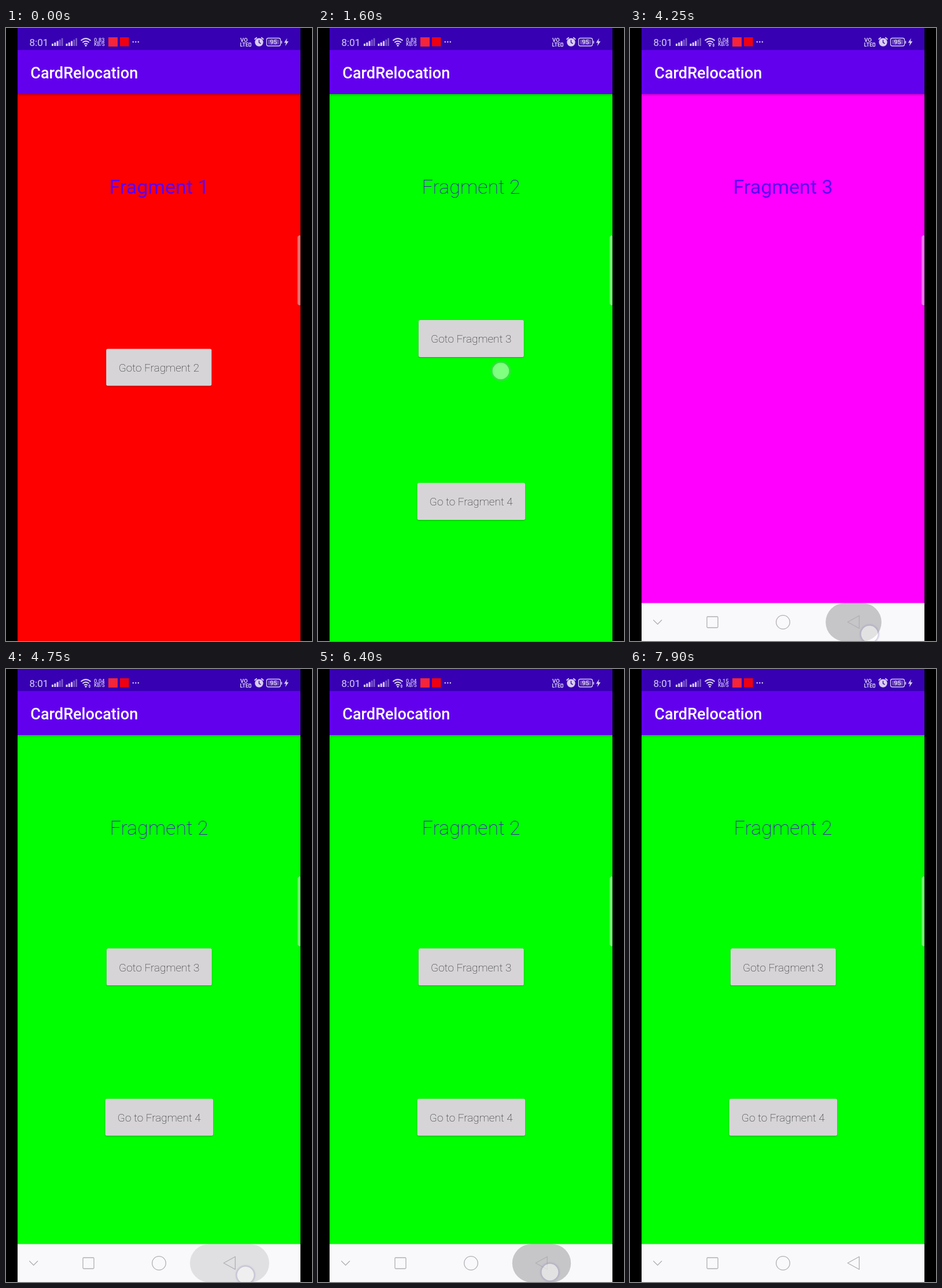
Animation of 529 by 1058 pixels, one loop 8000 ms. Source, as an HTML page:

```html
<!DOCTYPE html>
<html lang="en">
<head>
<meta charset="utf-8">
<title>Fragment screens</title>
<style>
html, body { margin: 0; width: 100%; height: 100%; overflow: hidden; background: #000; }
svg { display: block; width: 100%; height: 100%; font-family: Roboto, sans-serif; }

/* every track shares the 8 s loop; 1% = 80 ms */
.track { animation: 8s step-end infinite; }
.red { animation-name: red; }
.green { animation-name: green; }
.magenta { animation-name: magenta; }
.white { animation-name: white; }
.shift { animation-name: shift; }
.dot { animation-name: dot; }
.rate1 { animation-name: rate1; }
.rate2 { animation-name: rate2; }
.rate3 { animation-name: rate3; }
.traffic { animation-name: traffic; }
.nav { animation: nav 8s cubic-bezier(.2, .6, .3, 1) infinite; }
.ripple { animation: ripple 8s linear infinite; }

@keyframes red {
  0%, 84.375% { opacity: 1; }
  19.375%, 96.25%, 100% { opacity: 0; }
}
@keyframes green {
  0%, 33.75%, 68.125%, 84.375% { opacity: 0; }
  19.375%, 58.125%, 79.375%, 96.25%, 100% { opacity: 1; }
}
@keyframes magenta {
  0%, 58.125%, 100% { opacity: 0; }
  33.75% { opacity: 1; }
}
@keyframes white {
  0%, 79.375%, 100% { opacity: 0; }
  68.125% { opacity: 1; }
}
/* buttons re-centre once the navigation bar takes its space */
@keyframes shift {
  0% { transform: translateY(0); }
  48.75%, 100% { transform: translateY(var(--d)); }
}
@keyframes nav {
  0%, 46.25% { transform: translateY(66px); }
  49.375%, 100% { transform: translateY(0); }
}
@keyframes dot {
  0% { opacity: 0; transform: translate(316px, 592px); }
  18.125% { opacity: 1; transform: translate(316px, 592px); }
  21.875% { opacity: 0; transform: translate(299px, 528px); }
  32.5% { opacity: 1; transform: translate(299px, 528px); }
  36.25% { opacity: 0; transform: translate(414px, 1046px); }
  52.5% { opacity: 1; transform: translate(414px, 1046px); }
  60.625% { opacity: 0; transform: translate(311.5px, 769.5px); }
  66.875% { opacity: 1; transform: translate(311.5px, 769.5px); }
  69.375% { opacity: 0; transform: translate(401px, 1041px); }
  76.875% { opacity: 1; transform: translate(401px, 1041px); }
  79.375% { opacity: 0; transform: translate(401px, 1041px); }
  80% { opacity: 1; transform: translate(401px, 1041px); }
  86.875% { opacity: 0; transform: translate(312px, 558px); }
  95% { opacity: 1; transform: translate(312px, 558px); }
  98.125%, 100% { opacity: 0; transform: translate(312px, 558px); }
}
@keyframes ripple {
  0%, 52.49% { opacity: 0; x: 386.5px; width: 0; }
  52.5% { opacity: .2; x: 386.5px; width: 0; animation-timing-function: cubic-bezier(.1, .9, .2, 1); }
  56.875% { opacity: .2; x: 318px; width: 137px; animation-timing-function: cubic-bezier(0, 0, .8, 1); }
  62.5% { opacity: 0; x: 318px; width: 137px; }
  76.87% { opacity: 0; x: 386.5px; width: 0; }
  76.875% { opacity: .2; x: 386.5px; width: 0; animation-timing-function: cubic-bezier(.1, .9, .2, 1); }
  79.37% { opacity: .2; x: 318px; width: 137px; }
  79.375% { opacity: .2; x: 386.5px; width: 0; animation-timing-function: cubic-bezier(.1, .9, .2, 1); }
  83.25% { opacity: .2; x: 318px; width: 137px; animation-timing-function: cubic-bezier(0, 0, .8, 1); }
  88.875%, 100% { opacity: 0; x: 318px; width: 137px; }
}
@keyframes rate1 { 0% { opacity: 1; } 48.75%, 100% { opacity: 0; } }
@keyframes rate2 { 0%, 86.25%, 100% { opacity: 0; } 48.75% { opacity: 1; } }
@keyframes rate3 { 0% { opacity: 0; } 86.25%, 100% { opacity: 1; } }
@keyframes traffic { 0%, 86.25%, 100% { opacity: 0; } 40% { opacity: 1; } }

.heading { font-size: 34px; text-anchor: middle; }
.bold { font-weight: 400; fill: #5c00f4; }
.thin { font-weight: 200; fill: #5000d0; }
.label { font-size: 19px; font-weight: 200; text-anchor: middle; fill: #222; }
.button { fill: #d6d4d7; filter: drop-shadow(0 1px 1px rgba(0, 0, 0, .3)); }
.status { fill: #d9cdf2; }
.dim { fill: #7d58cd; }
.tiny { font-size: 9.3px; font-weight: 500; }
.line { fill: none; stroke: #d9cdf2; }
.key { fill: none; stroke: #b1afb5; stroke-width: 1.3; stroke-linejoin: round; stroke-linecap: round; }
</style>
</head>
<body>
<svg viewBox="0 0 529 1058">
  <defs>
    <clipPath id="screen"><rect x="20" width="489" height="1058"/></clipPath>
    <linearGradient id="shade" x2="0" y2="1">
      <stop stop-opacity=".2"/><stop offset="1" stop-opacity="0"/>
    </linearGradient>
    <radialGradient id="halo">
      <stop offset=".76" stop-color="#a09cc4" stop-opacity="0"/>
      <stop offset=".82" stop-color="#a09cc4" stop-opacity=".45"/>
      <stop offset="1" stop-color="#a09cc4" stop-opacity="0"/>
    </radialGradient>
    <g id="bars">
      <path class="status" d="M0 31v-4h3v4zM4.3 31v-6h3v6zM8.6 31v-8.5h3v8.5z"/>
      <path class="dim" d="M12.9 31v-11h2.7v11zM16.8 31v-13.5h2.7v13.5z"/>
    </g>
  </defs>

  <rect width="529" height="1058"/>
  <g clip-path="url(#screen)">
    <g class="track red">
      <rect x="20" y="113" width="489" height="945" fill="#f00"/>
      <text class="heading bold" x="264.5" y="286">Fragment 1</text>
      <g class="track shift" style="--d:-32.7px">
        <rect class="button" x="173.2" y="553.7" width="182.2" height="63.8" rx="2.7"/>
        <text class="label" x="264.4" y="593">Goto Fragment 2</text>
      </g>
    </g>

    <g class="track green">
      <rect x="20" y="113" width="489" height="945" fill="#0f0"/>
      <text class="heading thin" x="264.5" y="286">Fragment 2</text>
      <g class="track shift" style="--d:-21.8px">
        <rect class="button" x="173.8" y="504.1" width="182" height="63.8" rx="2.7"/>
        <text class="label" x="264.8" y="543.4">Goto Fragment 3</text>
      </g>
      <g class="track shift" style="--d:-43.4px">
        <rect class="button" x="171.5" y="785.1" width="186.7" height="63.8" rx="2.7"/>
        <text class="label" x="264.8" y="824.4">Go to Fragment 4</text>
      </g>
    </g>

    <g class="track magenta">
      <rect x="20" y="113" width="489" height="945" fill="#f0f"/>
      <text class="heading bold" x="264.5" y="286">Fragment 3</text>
    </g>

    <g class="track white">
      <rect x="20" y="113" width="489" height="945" fill="#faf9fb"/>
      <text class="heading thin" x="264.5" y="286">Fragment 4</text>
    </g>

    <!-- app bar -->
    <rect x="20" y="114" width="489" height="4.5" fill="url(#shade)"/>
    <rect x="20" width="489" height="39" fill="#3700b3"/>
    <rect x="20" y="38" width="489" height="76" fill="#6200ee"/>
    <text x="42.2" y="86.5" font-size="27.1" font-weight="500" fill="#fff">CardRelocation</text>

    <!-- status bar, left -->
    <text class="status" x="40.5" y="31" font-size="17">8:01</text>
    <use href="#bars" x="79"/>
    <use href="#bars" x="103.5"/>
    <path class="line" stroke-width="2" d="M129.5 21.7Q138 14.5 146.5 21.7M132.3 25Q138 20.2 143.7 25M135 28Q138 25.6 141 28"/>
    <circle class="status" cx="138" cy="30.3" r="1.6"/>
    <path class="status track traffic" d="M142.2 29l2.2-2.6 2.2 2.6zM142.2 30l2.2 2.6 2.2-2.6z"/>
    <g class="status tiny">
      <text class="track rate1" x="152" y="23.6">0.83</text>
      <text class="track rate2" x="152" y="23.6">0.04</text>
      <text class="track rate3" x="152" y="23.6">0.15</text>
      <text x="152.3" y="31.4" style="font-size:8.2px">KB/S</text>
    </g>
    <rect x="177" y="16" width="16" height="16" fill="#f5253a"/>
    <rect x="197" y="16" width="15.5" height="15.5" fill="#f00010"/>
    <g class="status">
      <circle cx="219.8" cy="24" r="1.2"/>
      <circle cx="224.3" cy="24" r="1.2"/>
      <circle cx="228.8" cy="24" r="1.2"/>
    </g>

    <!-- status bar, right -->
    <g class="status" font-size="9.5" font-weight="700">
      <text x="405" y="23.6">VO</text>
      <text x="404.5" y="32.3" font-size="9">LTE</text>
    </g>
    <rect class="line" x="420" y="26" width="3.4" height="5.6" rx=".8" stroke-width="1.3"/>
    <circle class="status" cx="437.5" cy="24.6" r="7.2"/>
    <path class="line" stroke-width="2" stroke-linecap="round" d="M430.2 19.2l3-2.4M444.8 19.2l-3-2.4"/>
    <path d="M437.5 20.5v4.6l3 1.8" fill="none" stroke="#3700b3" stroke-width="1.4"/>
    <rect class="line" x="450.5" y="17.5" width="24" height="13.5" rx="3" stroke-width="1.3"/>
    <rect x="453" y="20" width="19" height="8.5" rx="1" fill="#6b45bd"/>
    <rect class="status" x="475.6" y="22" width="1.6" height="5" rx=".8"/>
    <text class="status" x="462.5" y="28.2" font-size="11" font-weight="500" text-anchor="middle">95</text>
    <path class="status" d="M486 17.5l-5.3 8h3.3l-1.2 5.8 5.6-8.2h-3.5z"/>

    <!-- edge handle -->
    <rect x="504" y="358" width="12" height="120.5" rx="4" fill="#fff" fill-opacity=".42" stroke="#777" stroke-opacity=".3"/>

    <!-- navigation bar -->
    <g class="nav">
      <rect x="20" y="992.5" width="489" height="66" fill="#f9f8fa"/>
      <rect class="ripple" x="386.5" y="992.5" width="0" height="66" rx="33"/>
      <path class="key" d="M40.7 1022l7 7 7-7"/>
      <rect class="key" x="133" y="1016" width="19" height="19" rx="1.5"/>
      <circle class="key" cx="264.5" cy="1025.5" r="11.8"/>
      <path class="key" d="M376.3 1025.3l20-11v22z"/>
    </g>

    <!-- touch point -->
    <g class="track dot">
      <circle r="18.5" fill="url(#halo)"/>
      <circle r="14.3" fill="#fff" fill-opacity=".5"/>
    </g>
  </g>
</svg>
</body>
</html>
```
